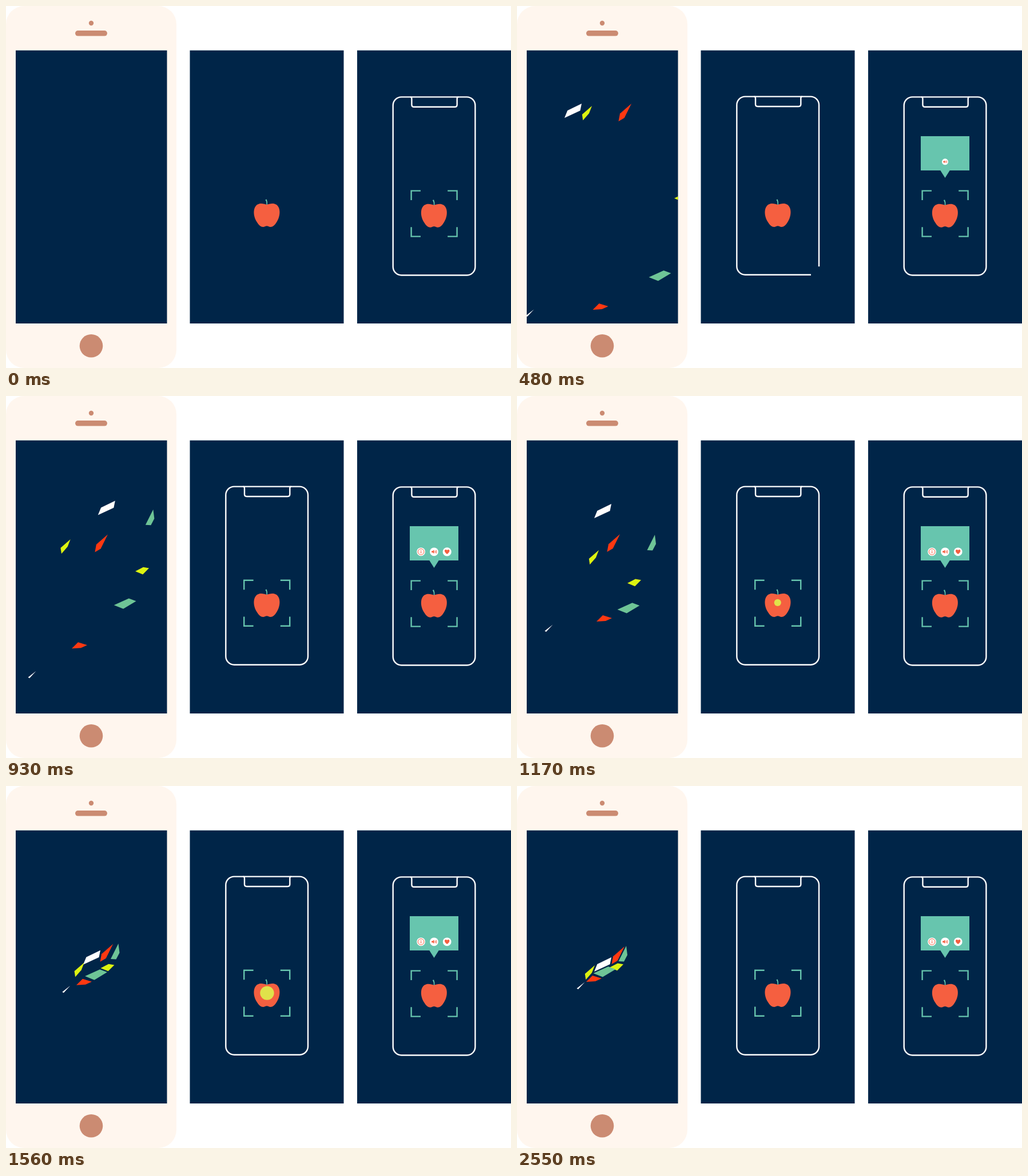
Recreate the animation shown at these times as an HTML page with a canvas. Size 883 by 634 pixels, loop 2.7 s.

```html
<!DOCTYPE html>
<html lang="en">
<head>
<meta charset="utf-8">
<title>Scan demo</title>
<style>
html, body { margin: 0; width: 100%; height: 100%; overflow: hidden; background: #fff; }
canvas { display: block; }
</style>
</head>
<body>
<canvas id="stage" width="883" height="634"></canvas>
<script>
const ctx = document.getElementById('stage').getContext('2d');
const LOOP = 2700, STEP = 30;
const NAVY = '#002548', CREAM = '#fff6ee', CLAY = '#cb8b72', MINT = '#67c5ae', CORAL = '#f55f40';
const GREEN = '#6ec496', YELLOW = '#ddf310', RED = '#ff3811', WHITE = '#fff';

const ramp = (a, b, t) => Math.min(1, Math.max(0, (t - a) / (b - a)));
const easeOut = p => 1 - (1 - p) ** 3;
const easeInOut = p => p < .5 ? 2 * p * p : 1 - 2 * (1 - p) ** 2;
const backOut = p => 1 + 2.7 * (p - 1) ** 3 + 1.7 * (p - 1) ** 2;
const pop = (start, t) => backOut(ramp(start, start + 330, t));

function fill(color, path) { ctx.fillStyle = color; ctx.fill(path); }
function stroke(color, width, path) {
  ctx.strokeStyle = color;
  ctx.lineWidth = width;
  ctx.stroke(path);
}
function rect(color, x, y, w, h, r = 0) {
  const p = new Path2D();
  p.roundRect(x, y, w, h, r);
  fill(color, p);
}
function disc(color, x, y, r) {
  if (r <= 0) return;
  const p = new Path2D();
  p.arc(x, y, r, 0, 7);
  fill(color, p);
}
function at(x, y, scale, draw) {
  if (scale <= 0) return;
  ctx.save();
  ctx.translate(x, y);
  ctx.scale(scale, scale);
  draw();
  ctx.restore();
}

// Each piece: colour, outline at rest, and three points of its drift relative to rest.
const feather = [
  [WHITE, 'M135 325L140.3 312 165 300 162.5 312.3Z', [-52, -129], [10, -122], [0, -111]],
  [YELLOW, 'M118.8 329L136 314 131 327 120.3 339.3Z', [-5, -139], [-27, -92], [7, -44]],
  [RED, 'M165.5 312L168 298.5 188 281 175.7 306Z', [12, -110], [-4, -60], [-8, -39]],
  [YELLOW, 'M162 317.8L176 310.6 186 312.3 175.2 323.2Z', [113, 19], [89, -8], [31, 10]],
  [GREEN, 'M133.5 328L159.5 316.2 172.3 321 149.8 334.6Z', [97, 147], [72, 69], [42, 46]],
  [RED, 'M121 343L132 332 148 337 137 342Z', [11.5, 189], [-8, 141], [18, 52]],
  [WHITE, 'M104.5 354.5L118.5 343.5 107 356Z', [-89, 188], [-76, 178], [-56, 57]],
  [GREEN, 'M177.5 307L191 280 193 296 187 307.5Z', [200, -230], [112, -140], [50, -37]]
].map(([color, d, ...drift]) => ({ color, path: new Path2D(d), drift }));

// Parabola through the values a, b, c at 480, 720 and 1170 ms.
function arc(a, b, c, t) {
  const ab = (b - a) / 240, bc = (c - b) / 450;
  return a + (t - 480) * (ab + (t - 720) * (bc - ab) / 690);
}

function drawFeather(t) {
  const spread = (1.2 - .2 * ramp(120, 480, t)) * (1 - ramp(1170, 1920, t)) ** 3;
  const s = Math.min(t, 1170);
  for (const { color, path, drift: [a, b, c] } of feather) {
    const x = arc(a[0], b[0], c[0], s), y = arc(a[1], b[1], c[1], s);
    at(x * spread, y * spread, 1, () => fill(color, path));
  }
}

function drawHandset(t) {
  rect(CREAM, 0, 0, 298, 634, 32);
  disc(CLAY, 149, 30, 4.2);
  rect(CLAY, 121, 43, 56, 9.6, 4.8);
  disc(CLAY, 149, 595.3, 20.3);
  rect(NAVY, 17, 77.7, 264.5, 478.3);
  ctx.save();
  ctx.beginPath();
  ctx.rect(17, 77.7, 264.5, 478.3);
  ctx.clip();
  if (t >= 120) drawFeather(t);
  ctx.restore();
}

// Outline starts and ends at the bottom right corner, running clockwise.
const FRAME = new Path2D('M514 470.7H399a14.7 14.7 0 0 1-14.7-14.7V173.3a14.7 14.7 0 0 1 14.7-14.7H513.3a14.7 14.7 0 0 1 14.7 14.7V456A14.7 14.7 0 0 1 514 470.7');
const FRAME_LEN = 886;
const NOTCH = new Path2D('M414.5 158.6Q417 158.6 417 161.6V172Q417 176 421 176H492.3Q496.3 176 496.3 172V161.6Q496.3 158.6 498.8 158.6');
const NOTCH_LEN = 119;
const APPLE = new Path2D('M456 348C461 346 468 344.5 473 348C481 354 479.5 369 473.5 378C469 386 463.5 388.5 459 386Q456 384.6 453 386C448.5 388.5 443 386 438.5 378C432.5 369 431 354 439 348C444 344.5 451 346 456 348Z');
const STALK = new Path2D('M453.5 339.3L455.7 338.4Q457.7 343 457 348.2L455.5 348Q456 343 453.5 339.3Z');
const CORNERS = new Path2D('M-40 -23.6V-40H-23.6M23.6 -40H40V-23.6M40 23.6V40H23.6M-23.6 40H-40V23.6');

function trace(path, len, part) {
  if (part <= 0) return;
  if (part < 1) ctx.setLineDash([len * part, len * 2]);
  stroke(WHITE, 2.4, path);
  ctx.setLineDash([]);
}
function drawScene(outline, notch, corners) {
  trace(FRAME, FRAME_LEN, outline);
  trace(NOTCH, NOTCH_LEN, notch);
  fill(CORAL, APPLE);
  fill(MINT, STALK);
  at(456.2, 362.8, corners, () => stroke(MINT, 2.4, CORNERS));
}

function drawScan(t) {
  rect(NAVY, 321.5, 77.7, 269, 478.3);
  drawScene(easeInOut(ramp(100, 528, t)), easeInOut(ramp(100, 450, t)), easeOut(ramp(570, 690, t)));
  const tap = ramp(1080, 1260, t) - ramp(1560, 1740, t);
  disc('#e0e24a', 455 + tap * 1.5, 361.2 + tap * 1.4, 12.2 * tap);
}

const HEART = new Path2D('M0 4.2C-2 2.4-4.2.8-4.2-1.4C-4.2-4-1.2-4.6 0-2.3C1.2-4.6 4.2-4 4.2-1.4C4.2.8 2 2.4 0 4.2Z');
const HORN = new Path2D('M-4.4-1.3H-2.6L0-3.2V3.2L-2.6 1.3H-4.4Z');
const WAVES = new Path2D('M1.2-1.4Q2 0 1.2 1.4M2.5-2.3Q3.8 0 2.5 2.3M3.7-3.1Q5.5 0 3.7 3.1');
const TAIL = new Path2D('M-8.5-13.5H8.5L0 0Z');
const RING = new Path2D();
RING.arc(0, 0, 5.3, 0, 7);

function button(x, scale, icon) {
  at(x, 272.8, scale, () => { disc(WHITE, 0, 0, 7.4); icon(); });
}
function drawResult(t) {
  rect(NAVY, 614, 77.7, 269, 478.3);
  at(292.4, .8, 1, () => drawScene(1, 1, 1));
  at(748.5, 301, easeOut(ramp(90, 300, t)), () => {
    rect(MINT, -42.5, -73, 85, 60);
    fill(MINT, TAIL);
  });
  button(725.6, pop(528, t), () => {
    stroke(CORAL, 1, RING);
    rect(CORAL, -.5, -1.1, 1.1, 3.8);
    disc(CORAL, 0, -2.6, .7);
  });
  button(771.2, pop(648, t), () => fill(CORAL, HEART));
  const press = easeInOut(ramp(1710, 1920, t)) - easeInOut(ramp(2370, 2550, t));
  button(748.5, pop(408, t) * (1 + .71 * press), () => {
    fill(CORAL, HORN);
    stroke(CORAL, .8, WAVES);
  });
}

function frame(now) {
  const t = Math.floor(now % LOOP / STEP) * STEP;
  ctx.fillStyle = WHITE;
  ctx.fillRect(0, 0, 883, 634);
  drawHandset(t);
  drawScan(t);
  drawResult(t);
  requestAnimationFrame(frame);
}
frame(performance.now());
</script>
</body>
</html>
```
